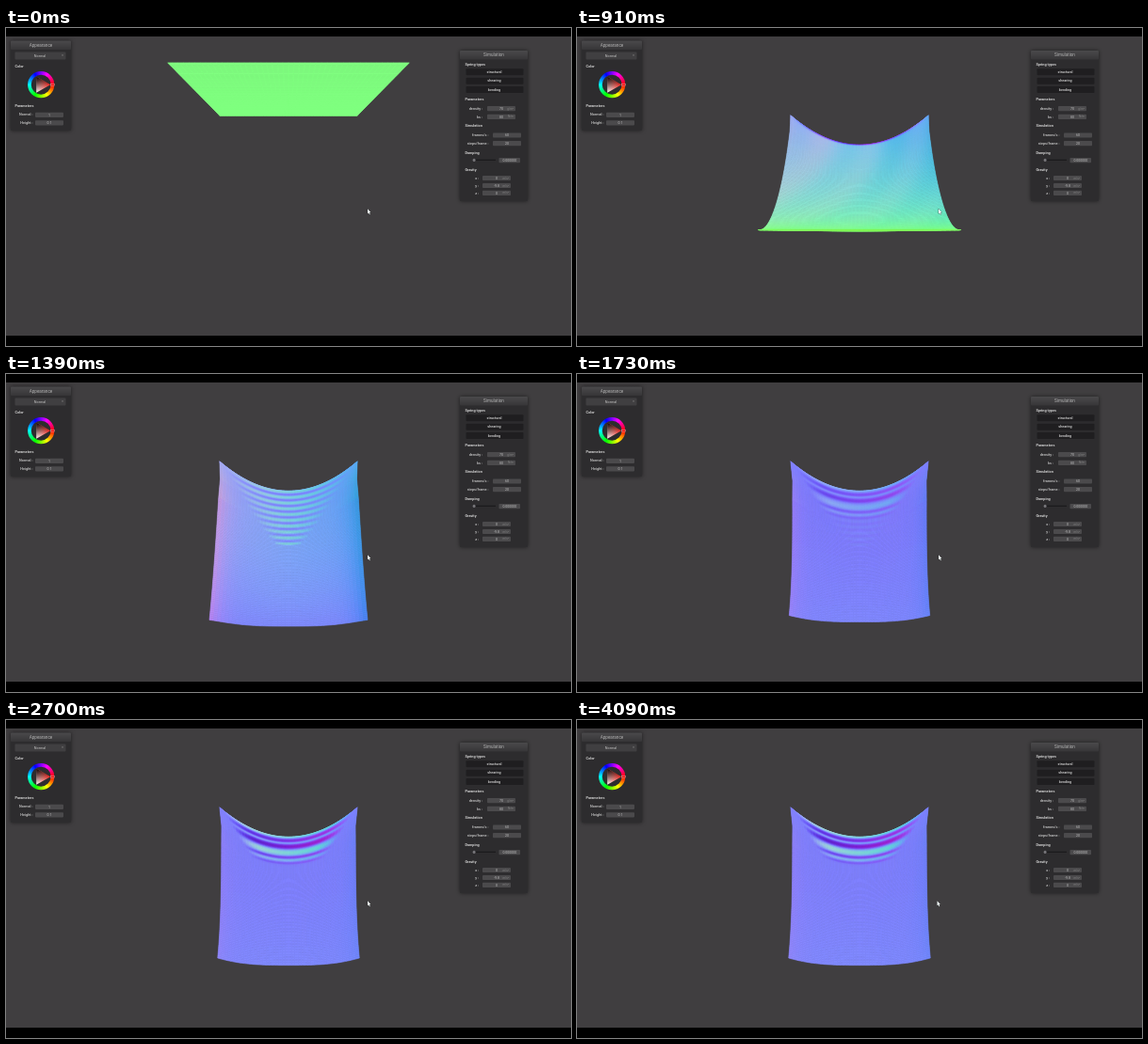
Recreate the animation shown at these times as an HTML page with a canvas. Size 600 by 338 pixels, loop 4.12 s.

```html
<!DOCTYPE html>
<html lang="en">
<head>
<meta charset="utf-8">
<title>Cloth simulation</title>
<style>
html, body { margin: 0; height: 100%; overflow: hidden; background: #000; }
canvas { display: block; }
</style>
</head>
<body>
<canvas id="stage" width="600" height="338"></canvas>
<script>
const LOOP = 4120;
const ctx = document.getElementById('stage').getContext('2d');

// ---------- helpers ----------
const bell = (x, c, w) => Math.exp(-(((x - c) / w) ** 2));
const smooth = (a, b, x) => {
  const k = Math.min(1, Math.max(0, (x - a) / (b - a)));
  return k * k * (3 - 2 * k);
};

function box(c, x, y, w, h, fill, r = 1) {
  c.fillStyle = fill;
  c.beginPath();
  c.roundRect(x, y, w, h, r);
  c.fill();
}

function label(c, str, x, y, align = 'left', size = 4, color = '#c4c4c4', weight = 400) {
  c.font = `${weight} ${size}px Roboto, "Open Sans", sans-serif`;
  c.textAlign = align;
  c.textBaseline = 'middle';
  c.fillStyle = color;
  c.fillText(str, x, y);
}

// ---------- static interface ----------
function panel(c, x, y, w, h, title) {
  c.save();
  c.shadowColor = 'rgba(0,0,0,.55)';
  c.shadowBlur = 4;
  box(c, x, y, w, h, '#2d2c2e');
  c.restore();
  const g = c.createLinearGradient(0, y, 0, y + 9.5);
  g.addColorStop(0, '#4a494b');
  g.addColorStop(1, '#373638');
  box(c, x, y, w, 9.5, g);
  label(c, title, x + w / 2, y + 5, 'center', 4.6, '#b4b4b4');
}

const heading = (c, str, x, y) => label(c, str, x, y, 'left', 3.8, '#d4d4d4', 700);

function field(c, name, right, x, y, value, unit = '', w = 30) {
  label(c, name, right, y, 'right', 3.8, '#d0d0d0', 500);
  box(c, x, y - 2.6, w, 5.2, '#4b4a4c', .8);
  label(c, value, x + w / 2, y + .2, 'center', 3.5, '#c0c0c0');
  if (unit) label(c, unit, x + w - 2, y + .2, 'right', 3, '#858585');
}

function wheel(c, x, y) {
  const hue = c.createConicGradient(0, x, y);
  for (let i = 0; i <= 6; i++) hue.addColorStop(i / 6, `hsl(${i * 60} 100% 50%)`);
  c.strokeStyle = hue;
  c.lineWidth = 3.6;
  c.beginPath();
  c.arc(x, y, 12.3, 0, 7);
  c.stroke();

  const [a, b, d] = [0, 2, 4].map(k => [x + 10 * Math.cos(k * Math.PI / 3), y + 10 * Math.sin(k * Math.PI / 3)]);
  const tint = c.createLinearGradient(...a, ...b);
  tint.addColorStop(0, '#f02018');
  tint.addColorStop(1, '#fff');
  const shade = c.createLinearGradient((a[0] + b[0]) / 2, (a[1] + b[1]) / 2, ...d);
  shade.addColorStop(0, 'rgba(0,0,0,0)');
  shade.addColorStop(1, '#000');
  for (const fill of [tint, shade]) {
    c.fillStyle = fill;
    c.beginPath();
    for (const p of [a, b, d]) c.lineTo(...p);
    c.fill();
  }
  c.strokeStyle = '#d8b0b0';
  c.lineWidth = .5;
  c.strokeRect(x + 10.2, y - 1, 4.2, 2);
}

function drawInterface(c) {
  c.fillStyle = '#000';
  c.fillRect(0, 0, 600, 338);
  c.fillStyle = '#403e40';
  c.fillRect(0, 9, 600, 318);

  panel(c, 5, 13.5, 64, 95.5, 'Appearance');
  box(c, 9.5, 25.5, 54, 8, '#403f41');
  label(c, 'Normal', 36, 29.6, 'center', 3.8);
  label(c, '▾', 60, 29.4, 'center', 3, '#999');
  heading(c, 'Color', 9.5, 40.5);
  wheel(c, 37.2, 60.2);
  heading(c, 'Parameters', 9.5, 82.5);
  field(c, 'Normal :', 28.5, 31, 92.3, '1');
  field(c, 'Height :', 28.5, 31, 100.8, '0.1');

  panel(c, 482, 24, 72, 160, 'Simulation');
  heading(c, 'Spring types', 487.5, 38.5);
  ['structural', 'shearing', 'bending'].forEach((name, i) => {
    const y = 43.3 + i * 9.4;
    box(c, 488.5, y, 61, 7, '#1f1e20');
    label(c, name, 518.5, y + 3.6, 'center', 3.7, '#dcdcdc', 500);
  });
  heading(c, 'Parameters', 487.5, 76);
  field(c, 'density :', 506, 511, 85.7, '70', 'g/m²');
  field(c, 'ks :', 506, 511, 94.4, '80', 'N/m');
  heading(c, 'Simulation', 487.5, 104.2);
  field(c, 'frames/s :', 512.5, 517, 114, '60');
  field(c, 'steps/frame :', 512.5, 517, 122.7, '20');
  heading(c, 'Damping', 487.5, 132.6);
  box(c, 497, 139.8, 23, 1.2, '#1b1a1c', .5);
  box(c, 495.6, 138.7, 3, 3.4, '#77767a', 1.5);
  field(c, '', 0, 523.5, 140.6, '0.000000', '', 22.5);
  heading(c, 'Gravity', 487.5, 150.4);
  field(c, 'x :', 502, 506, 159.5, '0', 'm/s²');
  field(c, 'y :', 502, 506, 167.5, '-9.8', 'm/s²');
  field(c, 'z :', 502, 506, 175.4, '0', 'm/s²');
}

const ui = document.createElement('canvas');
ui.width = 600;
ui.height = 338;
drawInterface(ui.getContext('2d'));

// ---------- cloth ----------
// World: x right, y down, z depth; the cloth is 2 wide and pinned at its back corners.
const FOCAL = 340, PIN_Y = -1.014, PIN_Z = 4.65;
const COLS = 44, ROWS = 130;

// Side profile as a Bezier from the pin: seconds, z1, y1, z2, y2, z3, y3, hem bulge
const PROFILE = [
  [0, 3.98, PIN_Y, 3.32, PIN_Y, 2.65, PIN_Y, 0],
  [.3, 4.35, -.843, 3.5, -.843, 2.65, -.843, 0],
  [.55, 4.5, -.44, 3.55, -.44, 2.66, -.44, 0],
  [.73, 4.53, -.3, 3.7, .1, 2.82, -.02, 0],
  [.91, 4.45, -.4, 3.75, .58, 3.18, .44, 0],
  [1.11, 4.45, -.35, 4.02, .5, 3.62, .95, .03],
  [1.25, 4.45, -.3, 4.12, .45, 3.95, 1.1, .09],
  [1.39, 4.48, -.29, 4.22, .44, 4.17, 1.14, .1],
  [1.67, 4.66, -.27, 4.66, .48, 4.62, 1.22, .1],
  [2.12, 4.65, -.29, 4.65, .437, 4.6, 1.16, .107]
];

// Settled folds below the top edge: position, width, strength
const FOLDS = [
  [.004, .012, .9], [.033, .014, -.8], [.052, .008, .5], [.08, .017, -1.2],
  [.127, .022, 1], [.163, .01, -.6], [.186, .009, .5], [.21, .008, -.3]
];

function profileAt(t) {
  const last = PROFILE.length - 1;
  if (t >= PROFILE[last][0]) return PROFILE[last].slice(1);
  const i = PROFILE.findIndex(k => k[0] > t) - 1;
  const a = PROFILE[i], b = PROFILE[i + 1], h = b[0] - a[0], k = (t - a[0]) / h;
  const slope = (n, j) => n === 0 || n === last ? 0 :
    (PROFILE[n + 1][j] - PROFILE[n - 1][j]) / (PROFILE[n + 1][0] - PROFILE[n - 1][0]);
  return a.slice(1).map((p, n) => {
    const j = n + 1, k2 = k * k, k3 = k2 * k;
    return p * (2 * k3 - 3 * k2 + 1) + b[j] * (3 * k2 - 2 * k3) +
      h * (slope(i, j) * (k3 - 2 * k2 + k) + slope(i + 1, j) * (k3 - k2));
  });
}

const bezier = (a, b, c, d, s) => {
  const r = 1 - s;
  return a * r * r * r + 3 * b * r * r * s + 3 * c * r * s * s + d * s * s * s;
};

function drawCloth(t) {
  const [z1, y1, z2, y2, z3, y3, bulge] = profileAt(t);
  const hang = smooth(.6, 1.3, t);
  const maxSag = .43 + .15 * bell(t, .55, .12);
  const curl = .05 * bell(t, 1.35, .3) + .015 * hang;
  const early = bell(t, 1.4, .25), late = smooth(1.45, 2.1, t), swing = bell(t, .92, .2);
  const fallen = 1.9 * t * t;

  const point = (u, v) => {
    const sag = Math.min(fallen, maxSag * (1 - u * u));
    const x = u * (1 + hang * (.045 * v ** 4 - .03 * Math.min(1, 8 * v)));
    const y = bezier(PIN_Y + sag, y1 + .75 * hang * sag, y2 + .5 * hang * sag,
      y3 + bulge * (1 - Math.abs(u) ** 3), v);
    const z = bezier(PIN_Z, z1, z2, z3, v) - curl * Math.min(1, 4 * v) * u ** 8;
    const s = FOCAL / z;
    return { x, y, z, sx: 300 + x * s, sy: 167 + y * s };
  };

  const ripple = (u, v) => {
    let r = -1.2 * swing * bell(v, 0, .015) * (1 - u * u);
    const reach = .95 - 1.8 * v;
    if (reach <= .2) return r;
    const env = Math.max(0, 1 - (u / reach) ** 2);
    const settled = FOLDS.reduce((sum, [c, w, a]) => sum + a * bell(v, c, w), 0);
    return r + Math.min(1, env * 1.6) * late * settled +
      env * early * (1 - late) * (.15 + .45 * Math.sin(v * 140));
  };

  const rowAt = i => {
    const v = (i / ROWS) ** 1.5;
    return Array.from({ length: COLS + 1 }, (_, j) => point(j / COLS * 2 - 1, v));
  };

  ctx.lineWidth = .6;
  ctx.lineJoin = 'round';
  let top = rowAt(0);
  for (let i = 0; i < ROWS; i++) {
    const low = rowAt(i + 1), v = ((i + .5) / ROWS) ** 1.5;
    for (let j = 0; j < COLS; j++) {
      const a = top[j], b = top[j + 1], c = low[j + 1], d = low[j];
      const u = (j + .5) / COLS * 2 - 1;
      const du = k => b[k] + c[k] - a[k] - d[k], dv = k => c[k] + d[k] - a[k] - b[k];
      const xu = du('x'), yu = du('y'), zu = du('z'), xv = dv('x'), yv = dv('y'), zv = dv('z');
      let nx = zu * yv - yu * zv, ny = zu * xv - xu * zv, nz = xu * yv - yu * xv;
      const len = Math.hypot(nx, ny, nz) || 1, r = ripple(u, v);
      nx = nx / len - .7 * u * r + .12 * swing * Math.sin(9 * u + 14 * v * v) * (1 - v);
      ny = ny / len + r;
      nz /= len;
      const n = 127 / Math.hypot(nx, ny, nz);
      ctx.fillStyle = ctx.strokeStyle =
        `rgb(${Math.round(128 + nx * n)},${Math.round(128 + ny * n)},${Math.round(128 + nz * n)})`;
      ctx.beginPath();
      ctx.moveTo(a.sx, a.sy);
      ctx.lineTo(b.sx, b.sy);
      ctx.lineTo(c.sx, c.sy);
      ctx.lineTo(d.sx, d.sy);
      ctx.closePath();
      ctx.fill();
      ctx.stroke();
    }
    top = low;
  }
}

function drawCursor(t) {
  const x = 384 - 1.5 * smooth(3.82, 4.08, t), y = 192.3;
  ctx.beginPath();
  for (const [dx, dy] of [[0, 0], [0, 5], [1.1, 4.1], [2, 6], [2.8, 5.6], [2, 3.7], [3.4, 3.6]])
    ctx.lineTo(x + dx, y + dy);
  ctx.closePath();
  ctx.strokeStyle = '#222';
  ctx.lineWidth = .5;
  ctx.stroke();
  ctx.fillStyle = '#f4fbfb';
  ctx.fill();
}

const start = performance.now();
function frame() {
  const t = (performance.now() - start) % LOOP / 1000;
  ctx.drawImage(ui, 0, 0);
  drawCloth(t);
  drawCursor(t);
  requestAnimationFrame(frame);
}
frame();
</script>
</body>
</html>
```
